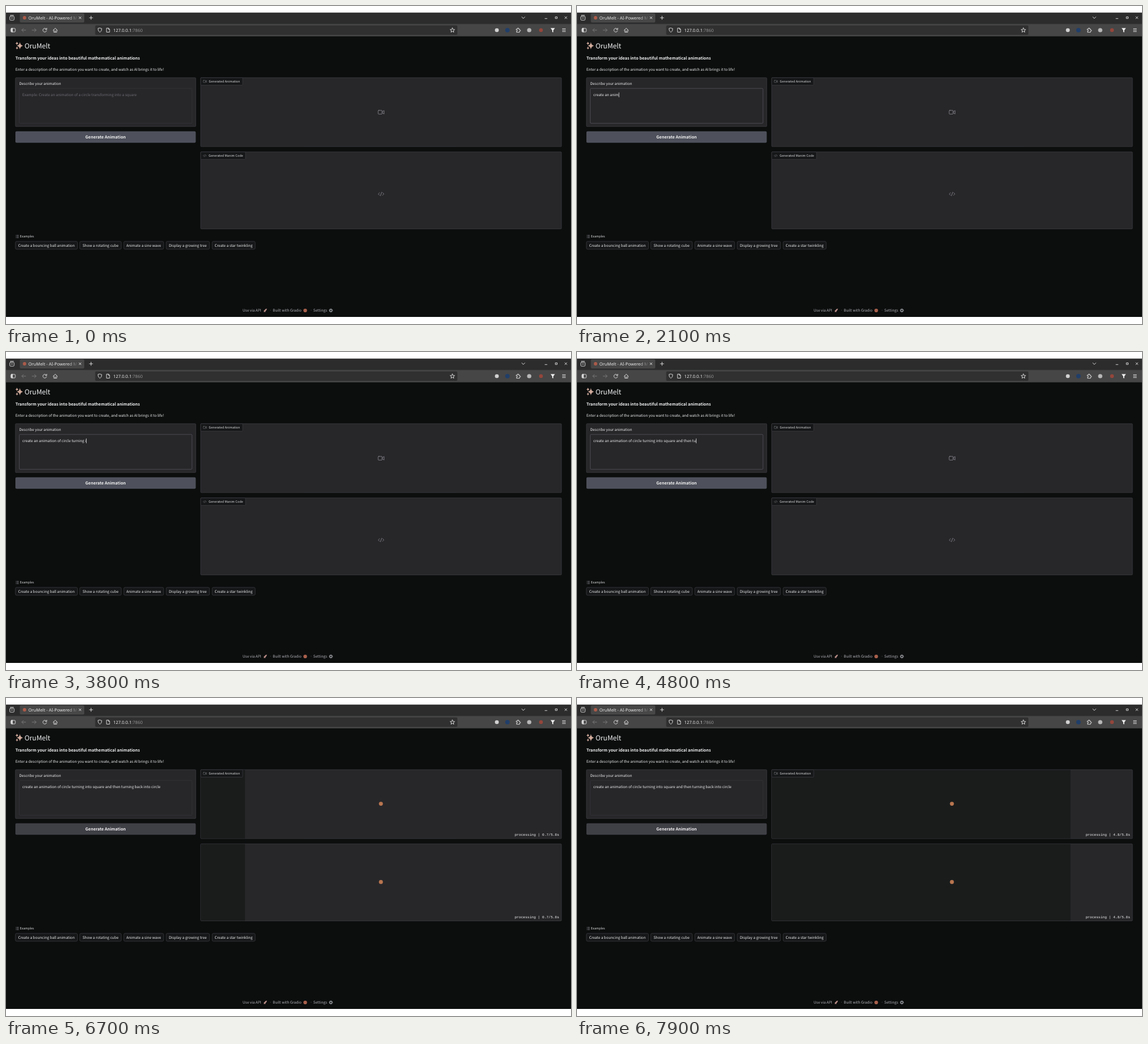
Animation, 960 px wide and 540 px high, one loop 8 s. Source, as an HTML page:

```html
<!DOCTYPE html>
<html lang="en">
<head>
<meta charset="utf-8">
<title>Prompt to animation</title>
<style>
  html, body { margin: 0; width: 100%; height: 100%; overflow: hidden; background: #fff; }
  svg { display: block; width: 960px; height: 540px; }
  text { font: 6.24px "Noto Sans CJK JP", "Noto Sans CJK SC", "Noto Sans CJK", "Noto Sans", sans-serif;
         fill: #f0f0f1; white-space: pre; text-rendering: geometricPrecision; }
  .ui { font: 7.33px "Noto Sans", sans-serif; fill: #e9e9e9; }
  .strong { font-size: 7px; font-weight: 600; }
  .small { font-size: 5.36px; fill: #dededf; }
  .foot { fill: #b4b4b8; }
  .time { font: 6px "Liberation Mono", monospace; text-anchor: end; }
  .panel { fill: #27272a; stroke: #3f3f44; stroke-width: .7; }
  .tag { fill: #151718; stroke: #3f3f44; stroke-width: .7; }
  .line { fill: none; stroke: #e2e2e2; stroke-width: .9; stroke-linecap: round; stroke-linejoin: round; }
  .dim { stroke: #7b7b7b; }
  .thin { stroke: #a5a5aa; stroke-width: .65; }
</style>
</head>
<body>
<svg id="stage" viewBox="0 0 960 540">
  <defs>
    <linearGradient id="fade" x1="106" x2="122" gradientUnits="userSpaceOnUse">
      <stop offset="0" stop-color="#e9e9e9"/><stop offset="1" stop-color="#e9e9e9" stop-opacity="0"/>
    </linearGradient>
    <g id="camera">
      <rect x="-5" y="-3.2" width="6.8" height="6.4" rx="1.1"/><path d="M1.8-.7 5-2.9V2.9L1.8.7"/>
    </g>
    <path id="code" d="M-2.6-2.2-4.8 0-2.6 2.2M2.6-2.2 4.8 0 2.6 2.2M1-3-1 3"/>
    <path id="spark" d="M0-1Q.15-.15 1 0 .15.15 0 1-.15.15-1 0-.15-.15 0-1"/>
  </defs>

  <!-- Browser window -->
  <rect y="11.5" width="960" height="516.5" fill="#0c0e0e"/>
  <rect y="11.5" width="960" height="18.8" fill="#2c2c2d"/>
  <rect y="30.3" width="960" height="21.2" fill="#464646"/>
  <rect x="23.5" y="12.5" width="109.5" height="15.5" rx="2" fill="#474747"/>
  <rect x="151.5" y="33" width="615.5" height="16" rx="2" fill="#303031"/>
  <circle cx="31.5" cy="20" r="2.9" fill="#ab5b4a"/>
  <text class="ui" x="38" y="22.7" style="fill:url(#fade)">OruMelt - AI-Powered M</text>
  <text class="ui" x="182.3" y="43.6">127.0.0.1<tspan fill="#929292">:7860</tspan></text>
  <g class="line">
    <rect x="6.4" y="17.4" width="7.4" height="6.6" rx="1.3"/><path d="M7.4 15.8H12.8M8.8 20.3H11.4"/>
    <path d="M124.1 18.3 127.5 21.7M127.5 18.3 124.1 21.7M144.5 17.2V22.8M141.7 20H147.3"/>
    <path d="M876.4 18.6 879 21.2 881.6 18.6M915.8 21.3H919.2M949.6 18.1 953 21.5M953 18.1 949.6 21.5"/>
    <rect x="933.7" y="18.4" width="2.8" height="2.8"/>
    <rect x="8.2" y="38" width="7.6" height="6" rx="1.2"/><path d="M9.5 39V43M10.6 38V44" stroke-width="1.6"/>
    <path class="dim" d="M33.6 41H26.8M29.6 38.2 26.8 41 29.6 43.8M44.4 41H51.2M48.4 38.2 51.2 41 48.4 43.8"/>
    <path d="M68.8 39.6A3.2 3.2 0 1 0 69 42M69.2 37.6V39.9H66.9"/>
    <path d="M80.2 41.2 83.7 37.6 87.2 41.2M81.2 40.6V44.4H86.2V40.6M83.7 44V42"/>
    <path d="M159.5 37.4 162.7 38.4Q162.7 43 159.5 44.7 156.3 43 156.3 38.4ZM171.2 37.6H174.2L176 39.4V44.4H171.2ZM174 37.8V39.6H175.8"/>
    <path d="M758.5 37.2 759.6 39.8 762.4 40 760.2 41.8 760.9 44.5 758.5 43 756.1 44.5 756.8 41.8 754.6 40 757.4 39.8Z"/>
    <path d="M867.4 39H869.2Q868.8 37.2 870 37.2T870.8 39H872.6V40.8Q874.4 40.5 874.4 41.7T872.6 42.6V44.6H867.4V42.6Q869.3 42.6 869.3 41.6T867.4 40.8Z"/>
    <path d="M945.4 38.6H950.6M945.4 41H950.6M945.4 43.4H950.6"/>
  </g>
  <circle cx="834" cy="41" r="3.3" fill="#d0d0d0"/>
  <circle cx="852" cy="41" r="3.8" fill="#203e69"/>
  <circle cx="889" cy="41" r="3.6" fill="#b8b8b8"/>
  <circle cx="909" cy="41" r="3.2" fill="#94463b"/>
  <path d="M925.3 37.6H932.7L929.9 41.2V44.8L928.1 44V41.2Z" fill="#f2f2f2"/>

  <!-- Page heading -->
  <g fill="#d0aa9b">
    <use href="#spark" transform="translate(23.6 67.4) scale(5.4 6.2)"/>
    <use href="#spark" transform="translate(18.6 63.4) scale(2.5 2.9)"/>
    <use href="#spark" transform="translate(18.7 71.4) scale(2.2 2.6)"/>
  </g>
  <text x="31.5" y="71.6" style="font-size:11.6px;font-weight:500">OruMelt</text>
  <text class="strong" x="16" y="91.4">Transform your ideas into beautiful mathematical animations</text>
  <text x="16" y="110.1">Enter a description of the animation you want to create, and watch as AI brings it to life!</text>

  <!-- Prompt form -->
  <rect class="panel" x="16" y="121.8" width="306.4" height="82.9" rx="1.2"/>
  <text x="22.5" y="134.1">Describe your animation</text>
  <rect class="panel" id="field" x="22.6" y="140" width="293.4" height="59.2" rx="1.2"/>
  <text id="hint" x="27.8" y="153.2" style="fill:#6d6d73">Example: Create an animation of a circle transforming into a square</text>
  <text id="prompt" x="27.8" y="153.2"></text>
  <rect id="caret" y="146.8" width=".7" height="8.2" fill="#f0f0f1"/>
  <rect id="button" x="16" y="212.8" width="306.4" height="19.4" rx="2"/>
  <text class="strong" x="169.2" y="225.2" text-anchor="middle">Generate Animation</text>

  <!-- Output panels -->
  <rect class="panel" x="330.8" y="121.8" width="613" height="117" rx="1.2"/>
  <rect class="panel" x="330.8" y="247.8" width="613" height="130.7" rx="1.2"/>
  <g id="idle">
    <g class="line thin">
      <use href="#camera" x="637.3" y="180.4"/><use href="#code" x="637.3" y="319.2"/>
    </g>
    <rect class="tag" x="330.8" y="247.8" width="76.2" height="12.6" rx="1.2"/>
    <use class="line thin" href="#code" transform="translate(337.7 254.2) scale(.58)"/>
    <text class="small" x="344.3" y="256.1">Generated Manim Code</text>
  </g>
  <g id="busy">
    <g id="bars" fill="#1a1c1c">
      <rect x="331.1" y="122.2" height="116.3"/><rect x="331.1" y="248.2" height="130"/>
    </g>
    <g fill="#b8754f"><circle cx="637" cy="179.6" r="3.4"/><circle cx="637" cy="312.4" r="3.4"/></g>
    <text class="time" x="939.8" y="234.2"></text>
    <text class="time" x="939.8" y="373.8"></text>
  </g>
  <rect class="tag" x="330.8" y="121.8" width="71.3" height="12.6" rx="1.2"/>
  <use class="line thin" href="#camera" transform="translate(338 128.1) scale(.58)"/>
  <text class="small" x="344.5" y="130.1">Generated Animation</text>

  <!-- Examples and footer -->
  <path class="line thin" d="M17 389.4H17.2M17 391.4H17.2M17 393.4H17.2M18.7 389.4H21.2M18.7 391.4H21.2M18.7 393.4H21.2"/>
  <text class="small" x="23.6" y="393.3">Examples</text>
  <g id="chips"></g>
  <text class="foot" x="402" y="519.2">Use via API</text>
  <path d="M443.4 513.8Q440.2 514.3 438.8 517L437.6 517.4 438.4 518.5 437.8 520 439.3 519.3 440.4 520 440.8 518.4Q443.2 516.8 443.4 513.8" fill="#b98c86"/>
  <text class="foot" x="447.6" y="519.2">·</text>
  <text class="foot" x="453.3" y="519.2">Built with Gradio</text>
  <circle cx="508.4" cy="517" r="3.1" fill="#a9604b"/>
  <text class="foot" x="516.4" y="519.2">·</text>
  <text class="foot" x="522" y="519.2">Settings</text>
  <g fill="none" stroke="#a6a9ad">
    <circle cx="552" cy="517" r="1.9" stroke-width="1.2"/>
    <circle cx="552" cy="517" r="2.9" stroke-width=".9" stroke-dasharray="1.14"/>
  </g>
</svg>
<script>
const LOOP = 8000, STEP = 100;
const PROMPT = "create an animation of circle turning into square and then turning back into circle";
// Typing progress: [time in ms, characters shown]
const TYPING = [[950, 0], [1300, 5], [1500, 7], [1650, 7], [2100, 14], [3800, 39], [4800, 61], [5600, 83]];
const FOCUS_AT = 800, CARET_END = 5800, SUBMIT_AT = 6500;
const ESTIMATE = 5.8, CLOCK_RATE = 3.41, CLOCK_START = 6492, BAR_WIDTH = 613;

const $ = id => document.getElementById(id);
const show = (el, on) => { el.style.display = on ? "" : "none"; };

$("chips").innerHTML = [
  [16, 105.4, "Create a bouncing ball animation"],
  [125.3, 70.6, "Show a rotating cube"],
  [200.2, 67.6, "Animate a sine wave"],
  [272.2, 73.5, "Display a growing tree"],
  [350.3, 73, "Create a star twinkling"]
].map(([x, width, label]) => `
  <rect class="tag" x="${x}" y="399.8" width="${width}" height="13.2" rx="2"/>
  <text x="${x + width / 2}" y="408.7" text-anchor="middle">${label}</text>`).join("");

function charsAt(t) {
  const next = TYPING.findIndex(([time]) => time > t);
  if (next === 0) return 0;
  if (next < 0) return PROMPT.length;
  const [t0, n0] = TYPING[next - 1], [t1, n1] = TYPING[next];
  return Math.floor(n0 + (n1 - n0) * (t - t0) / (t1 - t0));
}

function draw(t) {
  const count = charsAt(t), busy = t >= SUBMIT_AT;
  const focused = t >= FOCUS_AT && !busy;
  $("prompt").textContent = PROMPT.slice(0, count);
  show($("hint"), count === 0);
  show($("caret"), focused && t < CARET_END);
  $("caret").setAttribute("x", 27.9 + (count ? $("prompt").getComputedTextLength() : 0));
  $("field").style.stroke = focused ? "#5b5b62" : "#38383c";
  $("button").setAttribute("fill", busy ? "#3f3f46" : "#4e515b");
  show($("idle"), !busy);
  show($("busy"), busy);
  if (!busy) return;

  const elapsed = (t - CLOCK_START) / 1000 * CLOCK_RATE;
  for (const bar of $("bars").children) bar.setAttribute("width", BAR_WIDTH * elapsed / ESTIMATE);
  const label = `processing | ${(Math.floor(elapsed * 10) / 10).toFixed(1)}/${ESTIMATE}s`;
  for (const el of document.querySelectorAll(".time")) el.textContent = label;
}

const start = performance.now();
function tick() {
  const t = (performance.now() - start) % LOOP;
  draw(Math.floor(t / STEP) * STEP);
  requestAnimationFrame(tick);
}
tick();
</script>
</body>
</html>
```
